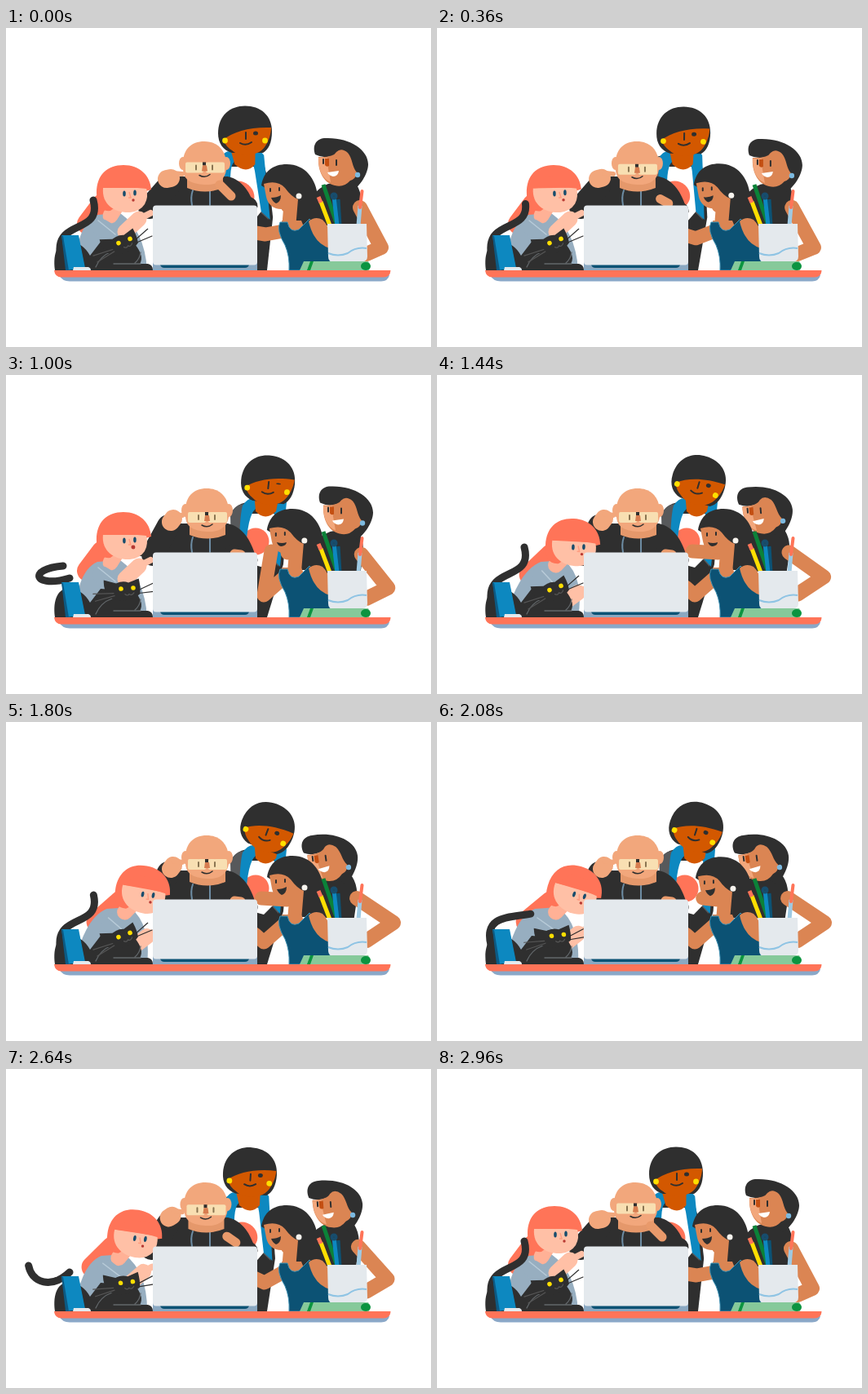
These frames come from a looping animation (521 px wide and 391 px high, 3 s). An HTML page:

```html
<!DOCTYPE html>
<html lang="en">
<head>
<meta charset="utf-8">
<title>Team around a laptop</title>
<style>
html, body { margin: 0; width: 100%; height: 100%; overflow: hidden; background: #fff; }
svg { display: block; width: 100%; height: 100%; }
.ink { fill: #2f2f2f; } .coral { fill: #ff7458; } .peach { fill: #ffc0a6; }
.tan { fill: #f2a77c; } .rust { fill: #d35800; } .bronze { fill: #db8553; }
.blue { fill: #0d88c0; } .teal { fill: #0c5274; } .steel { fill: #97aec0; }
.pale { fill: #e4e9ed; } .green { fill: #0b9440; } .cream { fill: #f8dfb2; }
.line, .limb { fill: none; stroke: #2f2f2f; stroke-width: 2; stroke-linecap: round; stroke-linejoin: round; }
.limb { stroke-width: 17; }
.skin { stroke: #db8553; } .light { stroke: #ffc0a6; }
</style>
</head>
<body>
<svg viewBox="0 0 521 391">
  <!-- standing woman -->
  <g id="standTorso">
    <path class="ink" d="M276 172Q280 158 296 156L338 152Q346 165 340 232L320 297H292L276 240Z"/>
    <path fill="#57595b" d="M275 172Q279 159 292 158L290 216H276Z M337 192L342 195L334 235L326 226Z"/>
    <path fill="#fff" d="M296 170H330V222L316 236L294 230Z"/>
    <circle class="coral" cx="306" cy="204" r="16.5"/>
    <path class="blue" d="M290 160Q298 148 308 152L306 164Q296 172 294 216H286Q286 175 290 160Z M328 152Q340 147 344 156L336 235L327 225L329 175Z"/>
    <path class="rust" d="M304 143H336L331 167Q318 180 306 167Z"/>
  </g>
  <g id="standHead">
    <path class="ink" d="M-33 4C-33 -18 -18 -29.500 0 -29.500C19 -29.500 33 -18 33 2C33 15 29 24 22 28H-16C-27 25 -33 16 -33 4Z"/>
    <path class="rust" d="M-27 12C-14 2 6 -4 32 -3C32 9 25 25 15 28C5 33 -8 32 -16 25Q-23 21 -27 12Z"/>
    <path class="line" d="M1 3V11M-6 16Q1 20 8 15"/>
    <ellipse id="standEye" class="ink" cx="13" cy="4" rx="3"/>
    <g fill="#ffdf00"><circle cx="-24.500" cy="13" r="3.400"/><circle cx="24.500" cy="13" r="3.400"/></g>
  </g>

  <!-- woman on the right -->
  <path id="rightTorso" class="ink" d="M380 201Q390 191 400 190L424 185Q438 198 435 222L432 242H388Z"/>
  <path id="rightArm" class="limb skin" style="stroke-width:18"/>
  <g id="rightHead">
    <path class="ink" d="M-32 -10C-36 -22 -30 -30 -19 -30C10 -31 33 -16 33 2C33 14 22 30 13 35L-2 22L-12 -8Q-22 -5 -32 -10Z"/>
    <path class="bronze" d="M-28 -7Q-10 -6 -6 -13Q0 -19 8 -12C14 -5 13 5 19 12Q18 20 11 22Q3 31 -8 28C-22 25 -29 10 -28 -7Z"/>
    <path class="tan" d="M-28 -6L-17 -6L-16 7L-13 24Q-28 18 -28 -6Z"/>
    <path fill="#c44f12" d="M-20 -5H-15V4Q-18 6 -20 3Z"/>
    <path class="line" d="M-22 -4V1M-6 -3V3"/>
    <path fill="#fff" d="M-17 12L-3 10Q-4 17 -10 17Q-15 16 -17 12Z"/>
    <circle cx="20" cy="15" r="3.200" fill="#7cb9df"/>
  </g>

  <!-- man -->
  <path class="ink" d="M163 222C180 202 190 187 212 182L272 182C290 186 300 202 306 222Z"/>
  <path id="manArm" class="limb" style="stroke-width:28"/>
  <path class="line" style="stroke:#6d8ca3" d="M228 217Q226 207 229 199M250 217V200"/>
  <g id="manHead">
    <path fill="#e5986b" d="M-21 14H23V29Q1 38 -21 29Z"/>
    <g class="tan"><ellipse cx="-26" cy="-1" rx="5" ry="8"/><ellipse cx="27" cy="-1" rx="5" ry="8"/>
      <path d="M-26 -2C-26 -18 -16 -28 0 -28S26 -18 27 -2V7C25 20 15 26 0 25S-25 20 -26 7Z"/></g>
    <g id="manFace">
      <rect class="cream" x="-23" y="0" width="22" height="13" rx="2"/><rect class="cream" x="2" y="0" width="23" height="13" rx="2"/>
      <path class="line" style="stroke:#8a7552" d="M-10 4V9M10 4V9"/>
      <path class="ink" d="M-2 0H2V4H-2Z"/>
      <path fill="#d77d50" d="M-2 4H3L4 11H-3Z"/>
      <path class="line" style="stroke-width:1.500" d="M-6 16Q1 20 7 15"/>
    </g>
  </g>
  <path id="manHand" class="limb" style="stroke:#f2a77c;stroke-width:22"/>
  <path id="manFinger" class="limb" style="stroke:#f2a77c;stroke-width:6"/>
  <path id="chinSleeve" class="limb" style="stroke-width:21"/>
  <path id="chinHand" class="limb" style="stroke:#e99a6b;stroke-width:11"/>

  <!-- woman in teal -->
  <path id="reach" class="limb skin"/>
  <g id="tealHead">
    <path class="ink" d="M313 193C316 175 328 167 344 167C367 167 380 185 382 206Q384 224 394 242H350L332 205Z"/>
    <path class="bronze" d="M316 191Q333 186 342 196Q350 207 358 210L355 246L338 246L340 222C329 223 321 217 319 207Z"/>
    <path class="line" d="M324 197V200M335 196V199"/>
    <path id="tealMouth" class="ink"/>
    <circle cx="359" cy="206" r="3.500" fill="#f7f4ee"/>
  </g>
  <path id="tealArm" class="limb skin"/>
  <path class="bronze" d="M338 236H362L370 256H340Z"/>
  <path class="teal" stroke="#3f90b2" d="M336 238Q331 248 342 266Q348 280 347 297H396L399 260L372 234L359 247Q348 252 345 238Z"/>
  <path class="bronze" d="M371 237Q379 230 388 235Q400 246 397 270Q377 264 371 237Z"/>

  <!-- red-haired woman -->
  <path id="braid" class="limb" style="stroke:#ff7458;stroke-width:26"/>
  <path id="shirt" class="steel" d="M84 297Q87 240 112 229L140 227Q170 248 173 297Z"/>
  <path id="neck" class="limb" style="stroke:#ffb196;stroke-width:19"/>
  <path id="sleeve" class="limb" style="stroke:#97aec0;stroke-width:22"/>
  <path id="fold" class="line" style="stroke:#b8cbd8;stroke-width:1.500"/>
  <g id="redHead">
    <path class="coral" d="M-33 4C-33 -18 -20 -30 0 -30C20 -30 33 -17 34 0L8 8L-16 26Q-33 28 -33 4Z"/>
    <path class="peach" d="M-25 -2H28Q31 9 26 18Q20 27 8 28C-10 29 -27 19 -25 -2Z"/>
    <path class="coral" d="M34 0Q10 -4 -25 -2L-10 -17H25Z"/>
    <g fill="#174d6d"><ellipse cx="1" cy="5" rx="1.800" ry="3.500"/><ellipse cx="14" cy="4" rx="1.800" ry="3.500"/></g>
    <circle id="redMouth" cx="12" cy="13" fill="#b83a33"/>
    <path d="M7 3L9 10H6" fill="none" stroke="#ff9d80" stroke-width="1.500"/>
  </g>
  <path id="redArm" class="limb light" style="stroke-width:19"/>
  <path id="redFinger" class="limb light" style="stroke-width:8"/>

  <!-- cat -->
  <path id="tail" class="line" style="stroke-width:9"/>
  <path class="ink" d="M60 297C57 275 64 261 78 261Q95 264 103 279L116 262L158 265Q170 280 164 289L174 289Q180 290 180 297Z"/>
  <path class="line" style="stroke:#62676a;stroke-width:1.300" d="M110 293Q116 279 130 274M132 289H165M158 288Q164 283 165 275"/>
  <g id="catHead">
    <path class="ink" d="M-28 -12L-13 -7Q-5 -10 2 -7L15 -11Q17 2 15 8Q5 16 -12 14Q-30 10 -28 -12Z"/>
    <g fill="#ffdf00"><circle cx="-7.500" cy="0" r="2.800"/><circle cx="7.500" cy="0" r="2.800"/></g>
    <path class="line" style="stroke:#555;stroke-width:1.200" d="M-3 7Q0 10 2 7Q5 10 8 6M-17 5L-42 4M-16 8L-40 13"/>
    <path class="line" style="stroke-width:1.200" d="M14 3L32 -4M14 7L34 6"/>
  </g>

  <!-- desk and things on it -->
  <path class="blue" d="M68 254H89L97 294L75 297Z"/><path fill="#0c5a84" d="M68 254L70 255L77 297H73Z"/>
  <path class="pale" d="M83 293H101Q104 294 104 297H82Z"/>
  <path fill="#8aa8c2" d="M180 286H308V297H180Z"/>
  <path class="teal" d="M189 290H298Q297 294 293 294H194Q190 294 189 290Z"/>
  <rect class="pale" x="180" y="217.500" width="128" height="73" rx="4"/>
  <path fill="#86c99a" d="M365 286H444Q448 291 445 297H360Z"/>
  <path class="green" d="M373 286H377L373 297H369Z"/><ellipse class="green" cx="441" cy="292" rx="6" ry="5"/>
  <g fill="none" stroke-width="5">
    <path stroke="#0b8238" d="M389 192L406 242"/><path stroke="#ffdf00" d="M386 213L397 242"/>
    <path stroke="#ff7458" d="M383 207L386 214"/><path stroke="#0c5274" d="M407 210L409 242"/>
    <path stroke="#0d88c0" d="M402 207L406 242"/><circle cx="402" cy="206" r="2" stroke="#174d6d"/>
    <path stroke="#9fcae3" d="M434 218L432 242"/><path stroke="#ff7458" stroke-linecap="round" d="M436.500 200L434 220" stroke-width="4"/>
  </g>
  <path class="pale" d="M394 240H442L443 280Q443 286 437 286H400Q395 286 395 280Z"/>
  <path fill="none" stroke="#8fc4e4" stroke-width="2" d="M395 276Q407 281 419 276Q429 268 442 270"/>
  <path fill="#8aa8c8" d="M65 303H470Q468 310.500 460 310.500H78Q69 310.500 65 303Z"/>
  <path class="coral" d="M59 297H471.500Q471 305.500 463 305.500H68Q60 305.500 59 297Z"/>
</svg>
<script>
const LOOP = 3000, STEP = 40, SWISH = LOOP / 2;

const ease = u => { u = Math.min(1, Math.max(0, u)); return u * u * (3 - 2 * u); };
// Rises from 0 to 1 between a and b, falls back between c and d.
const hold = (t, a, b, c, d) => ease((t - a) / (b - a)) - ease((t - c) / (d - c));
const mix = (from, to, k) => from.map((v, i) => v + (to[i] - v) * k);

const set = (id, attr, value) => document.getElementById(id).setAttribute(attr, value);
const place = (id, x, y, turn = 0) => set(id, 'transform', `translate(${x} ${y}) rotate(${turn})`);
const limb = (id, ...joints) => set(id, 'd', 'M' + joints.join('L'));

// Moves the top sideways while the row at y = 297 stays on the desk.
function shear(id, shift, height) {
  const k = shift / height;
  set(id, 'transform', `matrix(1 0 ${-k} 1 ${297 * k} 0)`);
}

function drawStanding(t) {
  const gather = hold(t, 0, 950, 1850, 2980);
  const tilt = hold(t, 700, 1800, 1800, 2960);
  shear('standTorso', 27 * (gather - 1), 137);
  place('standHead', 293 + 28.5 * gather, 125 + 3 * gather, 3 * gather + 18 * tilt);
  set('standEye', 'ry', 2.5 - 1.7 * hold(t, 450, 600, 1100, 1250));
}

function drawRight(t) {
  const away = hold(t, 0, 600, 1000, 1500), near = hold(t, 1050, 1700, 2350, 2960);
  const elbow = hold(t, 600, 1600, 2300, 2980);
  const sway = 6 * away - 13 * near;
  place('rightTorso', sway * .4, away - 2 * near);
  place('rightHead', 411 + sway, 165 + 1.5 * away + near, -8 * near);
  limb('rightArm', [434 + sway * .3, 220 - 4 * near], [460 + 3 * away + 15 * elbow, 269 - 23 * elbow], [442, 277 - 9 * elbow]);
}

function drawMan(t) {
  const lower = hold(t, 0, 600, 2350, 2920), lift = hold(t, 300, 1050, 2350, 2950);
  place('manHead', 243 + 3 * lower, 167);
  place('manFace', 0, 3.5 * lower - 2.5);
  limb('manArm', [176 + 4 * lift, 220], [199, 194 - 9 * lift]);
  limb('manHand', [197 + 5 * lift, 185 - 5 * lift], [202 + 3 * lift, 184 - 8 * lift]);
  limb('manFinger', [205, 178 - 8 * lift], [216, 179 - 7 * lift]);
  limb('chinSleeve', [298, 218 + 9 * lower], [272 + 6 * lower, 204 + 14 * lower]);
  limb('chinHand', [276 + 12 * lower, 206 + 14 * lower], [262 + 18 * lower, 192 + 27 * lower]);
}

function drawTeal(t) {
  const close = hold(t, 0, 1100, 1850, 2350), bend = hold(t, 150, 750, 2350, 2950);
  const touch = hold(t, 680, 960, 1050, 1350), cross = hold(t, 1100, 1440, 1800, 2450);
  const gape = 1 - hold(t, 200, 600, 1450, 1750);
  place('tealHead', 7 * close, -3 * close);
  set('tealMouth', 'd', `M325 208Q332 ${210 - 2 * gape} 337 ${208 - 3 * gape}Q337 ${212 + gape} 331 ${213 + 2 * gape}Q327 213 325 208Z`);
  limb('reach', [345, 218], [345 - 32 * cross, 216]);
  limb('tealArm', [340, 249], [318 - 2 * bend, 253 + 17 * bend], mix([300 + 5 * bend, 250 + 10 * bend], [325, 216], touch));
}

function drawRed(t) {
  const dip = hold(t, 1030, 1440, 2400, 2920), nod = hold(t, 1300, 2320, 2320, 2920);
  const back = hold(t, 200, 650, 700, 1030), gasp = hold(t, 300, 650, 1000, 1300);
  const dx = 22 * dip;
  place('redHead', 144 + dx - 4 * back + 3 * nod, 198 + 8 * dip, 2 * dip + 17 * nod - 3 * back);
  set('redMouth', 'r', 1.7 + .8 * gasp);
  limb('braid', [100 + 14 * dip - 5 * nod, 240 + 5 * dip], [118 + dx, 216 + 4 * dip]);
  shear('shirt', 14 * dip - 8 * nod, 60);
  limb('neck', [128 + .8 * dx, 230 + 3 * dip], [138 + dx, 214 + 4 * dip]);
  limb('sleeve', [117 + 11 * dip, 245], [142 + 14 * dip, 260 + 18 * dip - 8 * nod]);
  limb('fold', [113 + 16 * dip - 7 * nod, 236 + 4 * dip], [134 + 23 * dip, 253 + 18 * dip - 8 * nod]);
  const hand = [163 + 10 * dip, 234 + 33 * dip - 9 * nod];
  limb('redArm', [146 + 12 * dip, 250 + 28 * dip - 8 * nod], hand);
  limb('redFinger', hand, [177 + 4 * dip, 227 + 36 * dip - 10 * nod]);
}

function drawCat(t) {
  const p = t % SWISH;
  const droop = hold(p, 250, 680, 1250, 1440), curl = hold(p, 780, 990, 1180, 1400);
  const flick = hold(p, 1010, 1150, 1180, 1400), look = hold(p, 350, 660, 1050, 1420);
  const upright = [66, 273, 64 - 8 * droop, 235 + 2 * droop, 118 - 34 * droop, 252 - 14 * droop, 107 + 9 * droop, 211 + 28 * droop];
  const curled = [78, 249, 36 + 20 * flick, 262 + 8 * flick, 24 + 8 * flick, 238 + 25 * flick, 70 - 43 * flick, 234 + 7 * flick];
  const [x, y, ...bends] = mix(upright, curled, curl);
  set('tail', 'd', `M${x} ${y}C${bends.join(' ')}`);
  place('catHead', 145 + 3.5 * look, 261 + .5 * look, 16 * look - 20);
}

const figures = [drawStanding, drawRight, drawMan, drawTeal, drawRed, drawCat];
const start = performance.now();
function tick() {
  const time = Math.floor((performance.now() - start) / STEP) * STEP % LOOP;
  figures.forEach(figure => figure(time));
  requestAnimationFrame(tick);
}
tick();
</script>
</body>
</html>
```
